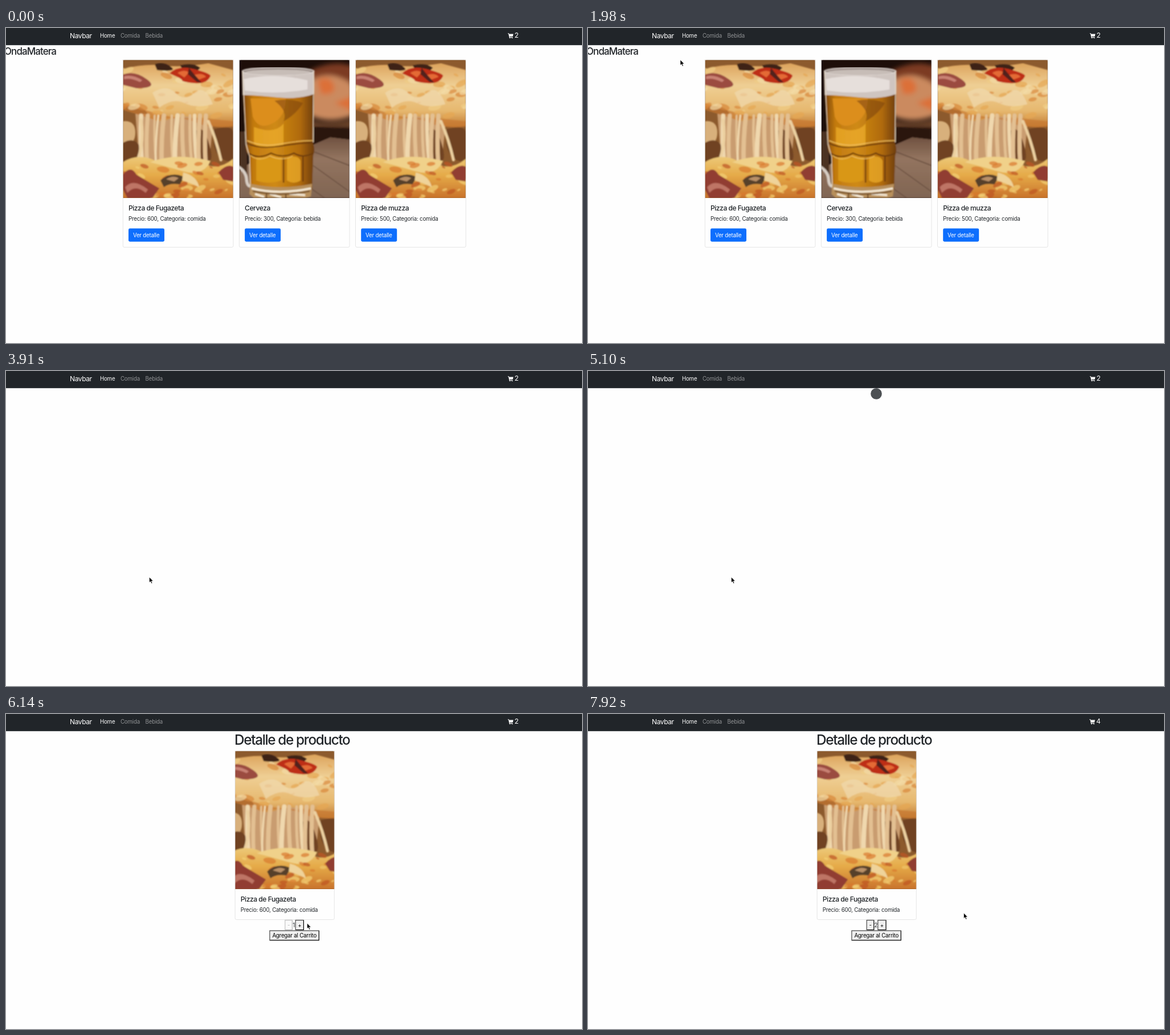
Write an HTML page that moves like this. It is 1011 by 554 pixels and loops after 8 s.

```html
<!DOCTYPE html>
<html lang="es">
<head>
<meta charset="utf-8">
<title>Tienda</title>
<style>
html, body { margin: 0; width: 100%; height: 100%; overflow: hidden; background: #fefefe; }
svg { display: block; }
#stage { width: 100vw; height: 100vh; }
text { font-family: Inter, "Liberation Sans", sans-serif; font-optical-sizing: none; fill: #212529; white-space: pre; }
.p { font-size: 9.7px; letter-spacing: -.021em; }
.h5 { font-size: 12.1px; letter-spacing: -.04em; }
.h3 { font-size: 17px; letter-spacing: -.055em; }
.h1 { font-size: 24.25px; letter-spacing: -.054em; }
.m { font-weight: 500; }
</style>
</head>
<body>
<svg id="stage" viewBox="0 0 1011 554" preserveAspectRatio="none">
  <defs>
    <filter id="soft" x="0" y="0" width="1" height="1"><feGaussianBlur stdDeviation=".8"/></filter>
    <filter id="blur"><feGaussianBlur stdDeviation="4"/></filter>
    <linearGradient id="melt" x2="0" y2="1">
      <stop stop-color="#dca35c"/><stop offset=".35" stop-color="#efcf94"/>
      <stop offset=".75" stop-color="#e6b86f"/><stop offset="1" stop-color="#c27a32"/>
    </linearGradient>
    <linearGradient id="base" x2="0" y2="1">
      <stop stop-color="#ecc878"/><stop offset=".45" stop-color="#e5aa48"/><stop offset="1" stop-color="#c9732b"/>
    </linearGradient>
    <linearGradient id="ale">
      <stop stop-color="#7c4508"/><stop offset=".15" stop-color="#c27a10"/><stop offset=".45" stop-color="#cf8a16"/>
      <stop offset=".8" stop-color="#b06a0a"/><stop offset="1" stop-color="#6d3d0a"/>
    </linearGradient>
    <linearGradient id="table" x2="0" y2="1">
      <stop stop-color="#6f5140"/><stop offset=".35" stop-color="#93745f"/><stop offset="1" stop-color="#806553"/>
    </linearGradient>
    <g id="pizza">
      <path fill="#8c5a2d" d="M0 0H194V243H0Z"/>
      <g filter="url(#soft)">
        <path fill="#c99c70" d="M22 95H160L150 195H30Z"/>
        <path fill="#d8b07c" d="M0 108Q22 106 22 128T0 150Z"/>
        <path fill="#704320" d="M0 146Q30 130 34 172L0 184ZM126 128Q140 108 152 150T134 172Q122 162 126 128ZM160 122Q194 112 194 130V178Q168 182 160 150Z"/>
        <path fill="url(#melt)" d="M0 16Q40 6 72 10T150 6L194 18V116Q160 122 138 108T84 104 44 96 0 82Z"/>
        <path fill="#c87930" d="M0 76Q38 88 66 96T136 102L194 108V118Q154 122 128 110T58 106L0 88Z" opacity=".65"/>
        <g id="topSpots"></g>
        <path fill="#9b4b40" d="M0 26Q20 18 42 34T24 50L0 44Z"/>
        <path fill="#c98274" d="M2 29Q18 25 34 36L30 39Q14 31 2 34Z"/>
        <path fill="#3d2419" d="M56 8Q70 2 84 12T60 18ZM100 10Q124 4 136 14L130 20 104 15Z"/>
        <path fill="#be2d18" d="M82 24Q96 9 124 16T154 28Q148 43 126 41T104 36 82 24Z"/>
        <path fill="#e46a35" d="M96 23Q108 16 116 22L108 31ZM124 27Q140 22 146 30L130 36Z"/>
        <path fill="#51231a" d="M116 14L124 24 138 40 130 39 114 25Z"/>
        <path fill="#f0d9ad" d="M52 58Q76 42 92 58T126 58 158 78Q128 86 108 76T64 84Z" opacity=".75"/>
        <g id="strands" fill="none" stroke-linecap="round"></g>
        <path fill="url(#base)" d="M0 180Q26 164 54 176T100 178 142 182 194 174V243H0Z"/>
        <path fill="#f0d18a" d="M48 180Q92 162 154 178 140 206 106 196T48 180Z"/>
        <g id="lowSpots"></g>
        <path fill="#913e32" d="M0 202Q14 184 24 202L64 226 52 243H8L0 228ZM168 198Q182 182 194 188V214L176 211Z"/>
        <path fill="#be7465" d="M4 224Q18 207 44 228L40 234Q22 218 8 234Z"/>
        <path fill="#56402c" d="M66 212Q84 195 108 206L100 219Q82 216 72 224Z"/>
        <path fill="#b99068" d="M76 210Q88 202 98 208L90 214Z"/>
        <path fill="#efd39a" d="M106 198Q130 204 134 224 118 216 104 212Z"/>
      </g>
    </g>
    <g id="beer">
      <path fill="#1d0e09" d="M0 0H194V243H0Z"/>
      <g filter="url(#blur)">
        <path fill="#7c3a20" d="M126 18Q168 -2 200 12V40H126Z"/>
        <path fill="#cb8a5e" d="M124 38Q158 14 200 44V98Q160 114 124 98Z"/>
        <path fill="#dc6f38" d="M138 36Q160 26 166 44T144 60ZM168 76L198 64V90Z"/>
        <path fill="#6d4429" d="M124 106Q160 116 200 104V120H124Z"/>
      </g>
      <g filter="url(#soft)">
        <path fill="url(#table)" d="M126 150L160 136 194 140V243H0V196L20 180Z"/>
        <path fill="#2a160f" d="M124 118L194 122V140L160 136 124 152Z"/>
        <path fill="none" stroke="#654b3c" stroke-width="1.4" d="M130 186L194 232M132 162L194 186M126 226L150 243"/>
        <path fill="#4c3020" d="M0 126H14V202L0 190Z"/>
        <path fill="none" stroke="#d8cec4" stroke-width="5" d="M-2 188Q12 196 13 210T22 222"/>
        <path fill="url(#ale)" d="M6 56H132L130 148Q134 158 130 168L128 228H20L18 170Q10 158 12 148Z"/>
        <path fill="#dc8e1e" d="M20 68H82Q82 100 58 112T24 100Z"/>
        <path fill="#7b430a" d="M62 72Q90 66 112 76 100 96 78 108 86 90 62 72Z" opacity=".55"/>
        <path fill="#efb02d" d="M26 118Q62 132 78 112V150Q50 162 26 148ZM84 172Q104 166 108 178V212Q96 220 84 212Z" opacity=".7"/>
        <path fill="#d99717" d="M30 172H74V212Q50 220 30 212Z"/>
        <path fill="none" stroke="#6b3b08" stroke-width="2.2" d="M12 146Q36 158 70 152T130 146M16 164Q34 176 56 164 76 174 96 164 112 174 130 164M78 172V216M112 170V214"/>
        <path fill="none" stroke="#f0c15e" stroke-width="1.4" d="M14 142Q40 154 72 148T129 142M20 168Q34 180 54 169 76 179 94 169"/>
        <path fill="#cfc5c0" d="M5 20Q66 10 132 20V60Q104 70 66 66T6 62Z"/>
        <path fill="#eee9e5" d="M8 34Q60 22 120 36V52Q66 62 10 54Z" opacity=".75"/>
        <ellipse cx="68.500" cy="20" rx="63" ry="7" fill="#9d918b" stroke="#e6dfda" stroke-width="1.5"/>
        <ellipse cx="68.500" cy="22" rx="57" ry="5" fill="#c7bdb7"/>
        <path fill="none" stroke="#e8dac4" stroke-width="1.4" d="M6 20L12 148 18 170 20 232M131 20L130 145"/>
        <path fill="#b8905c" d="M20 218Q72 230 128 218L126 240 116 243H26L18 236Z"/>
        <path fill="none" stroke="#f4e9d5" stroke-width="3.500" d="M22 226Q70 238 126 226M28 236L44 241M54 236L74 242M88 236L116 238"/>
        <path fill="none" stroke="#66411e" stroke-width="2" d="M24 231Q72 241 124 231M48 235V243M82 236V243"/>
      </g>
    </g>
  </defs>
  <rect width="1011" height="554" fill="#fefefe"/>
  <g id="list"></g>
  <circle id="spinner" cx="506" cy="40" r="9.8" fill="#212529"/>
  <g id="detail"></g>
  <g id="nav"></g>
  <g id="arrow"><path d="M0 0V9.600L2.200 7.600 3.700 11.200 5.300 10.500 3.800 7.100H6.800Z" stroke="#fff" stroke-width=".6"/></g>
  <g id="hand"><path d="M1.600 6V1.200a.9.9 0 0 1 1.800 0V4.200l2.700.6q1 .3.800 1.700L6.300 11H2.700L.3 7.400q-.4-1.200.5-1.400z" fill="#fff" stroke="#111" stroke-width=".8"/><path d="M3.700 7V9.500M5 7V9.500" stroke="#111" stroke-width=".4"/></g>
</svg>
<script>
const LOOP = 8000;
const $ = id => document.getElementById(id);
const show = (el, on) => el.setAttribute('display', on ? 'inline' : 'none');
const text = (x, y, cls, str, more = '') => `<text x="${x}" y="${y}" class="${cls}" ${more}>${str}</text>`;

let seed = 11;
const rand = () => (seed = seed * 16807 % 2147483647) / 2147483647;

function spots(n, top, height, colors) {
  let out = '';
  for (let i = 0; i < n; i++) {
    const x = rand() * 194, y = top + rand() * height, r = 2 + rand() * 6;
    out += `<ellipse cx="${x}" cy="${y}" rx="${r * 1.5}" ry="${r * .7}" fill="${colors[i % colors.length]}" opacity=".7" transform="rotate(${rand() * 60 - 30} ${x} ${y})"/>`;
  }
  return out;
}

function strands() {
  let out = '';
  for (let i = 0; i < 12; i++) {
    const x = 30 + i * 10.5 + rand() * 5, end = x + rand() * 10 - 5, w = 3 + rand() * 5;
    out += `<path d="M${x} 98Q${(x + end) / 2 - 3} 140 ${end} 182" stroke="${i % 3 ? '#e3c092' : '#f0d8ae'}" stroke-width="${w}"/>`;
  }
  return out + '<path d="M150 108Q164 140 172 176M32 106Q38 142 26 176" stroke="#ecd0a0" stroke-width="5"/>';
}

function card(x, y, w, h, art, name, info) {
  return `<svg x="${x}" y="${y}" width="${w}" height="243" viewBox="${(194 - w) / 2} 0 ${w} 243"><use href="#${art}"/></svg>
    <rect x="${x}" y="${y}" width="${w}" height="${h}" rx="2.500" fill="none" stroke="#dcdcdc" stroke-width=".7"/>`
    + text(x + 9.7, y + 264.6, 'h5 m', name) + text(x + 9.7, y + 283.2, 'p', info);
}

function listItem(x, art, name, info) {
  return card(x, 56, 193.6, 329.6, art, name, info)
    + `<rect class="btn" x="${x + 9.7}" y="352.500" width="63" height="23.200" rx="2.400" fill="#0d6efd"/>`
    + text(x + 17.6, 367.6, 'p', 'Ver detalle', 'style="fill:#fff"');
}

// Button with a raised border
function bevel(x, y, w, h, label, tx, fill, off) {
  const light = off ? '#c4c4c4' : '#4c4c4c', dark = off ? '#b4b4b4' : '#000', ink = off ? '#b0b0b0' : '#000';
  const r = x + w, b = y + h, k = 1.2;
  return `<rect x="${x}" y="${y}" width="${w}" height="${h}" fill="${fill}"/>
    <path fill="${light}" d="M${x} ${b}V${y}H${r}L${r - k} ${y + k}H${x + k}V${b - k}Z"/>
    <path fill="${dark}" d="M${r} ${y}V${b}H${x}L${x + k} ${b - k}H${r - k}V${y + k}Z"/>`
    + text(tx, y + 12.7, 'p', label, `style="fill:${ink}"`);
}

$('topSpots').innerHTML = spots(46, 14, 86, ['#f3dba6', '#e6a752', '#f0cd86', '#d9873a']);
$('lowSpots').innerHTML = spots(42, 182, 60, ['#f4d277', '#d9792e', '#f0c56a', '#bd5422']);
$('strands').innerHTML = strands();

$('list').innerHTML = text(-3, 47, 'h3 m', 'OndaMatera')
  + listItem(205.3, 'pizza', 'Pizza de Fugazeta', 'Precio: 600, Categoria: comida')
  + listItem(409.4, 'beer', 'Cerveza', 'Precio: 300, Categoria: bebida')
  + listItem(613.5, 'pizza', 'Pizza de muzza', 'Precio: 500, Categoria: comida');
$('detail').innerHTML = text(401, 54, 'h1 m', 'Detalle de producto')
  + card(402.1, 65, 174.2, 296.6, 'pizza', 'Pizza de Fugazeta', 'Precio: 600, Categoria: comida')
  + '<g id="buttons"></g>';
$('nav').innerHTML = '<rect width="1011" height="30.200" fill="#212529"/>'
  + text(112, 18.2, 'h5', 'Navbar', 'style="fill:#fff"')
  + text(165, 17.3, 'p', 'Home', 'style="fill:#fff"')
  + text(201, 17.3, 'p', 'Comida', 'style="fill:#909294"')
  + text(244.6, 17.3, 'p', 'Bebida', 'style="fill:#909294"')
  + `<g id="cart" fill="#fff"><path d="M0 0H1.900L2.200 1.200H9.700L8.600 5.900H3.200L3.400 6.800H8.300V7.700H2.600L1.200 1H0Z"/>
     <circle cx="3.700" cy="8.100" r=".95"/><circle cx="7.700" cy="8.100" r=".95"/></g>`
  + text(892.6, 17, 'h5', '2', 'id="total" style="fill:#fff"');

// Pointer stops: time, x, y
const stops = [
  [500, 359, 436], [650, 378, 440], [790, 402, 444], [940, 418, 446],
  [1230, 444, 432], [1380, 330, 262], [1530, 240, 146],
  [1830, 204, 92], [1980, 162, 56], [2120, 178, 13], [2270, 188, 20], [2420, 204, 84],
  [2570, 234, 200], [2720, 256, 312], [2860, 264, 366], [3010, 256, 364], [3160, 251.5, 362.5],
  [5690, 290, 336], [5840, 382, 312], [5990, 476, 336], [6140, 528.5, 368],
  [6290, 518, 370], [6440, 514, 370.5], [6740, 515, 374], [6890, 518, 381], [7040, 521, 386],
  [7185, 521.5, 387.5], [7920, 659.5, 350]
];
const within = (t, a, b) => t >= a && t < b;

let lastKey = '';
function drawButtons(t) {
  const two = t >= 6590, plusHot = within(t, 6290, 6890), addHot = within(t, 6890, 7920);
  const pressed = within(t, 7185, 7330);
  const key = [two, plusHot, addHot, pressed].join();
  if (key === lastKey) return;
  lastKey = key;
  const d = two ? .6 : 0;
  $('buttons').innerHTML =
    bevel(489.2 - d, 362, 13.8, 18.2, '-', 494 - d, two ? '#efefef' : '#fafafa', !two)
    + text(two ? 502.5 : 503.3, 374.7, 'p', two ? '2' : '1')
    + bevel(507.6 + d, 362, 15.4, 18.2, '+', 512.2 + d, plusHot ? '#e5e5e5' : '#efefef')
    + bevel(462.3, 380.5, 87.6, 18, 'Agregar al Carrito', 467.4, pressed ? '#f5f5f5' : addHot ? '#e5e5e5' : '#efefef');
}

function draw(t) {
  show($('list'), t < 3910);
  show($('detail'), t >= 5250);
  drawButtons(t);

  document.querySelector('.btn').setAttribute('fill', t < 3010 ? '#0d6efd' : t < 3160 ? '#0c66ea' : '#0b5ed7');

  const step = 148.7, age = Math.floor((t - 3910) / step) * step + 10;
  const phase = age / 750 % 1;
  show($('spinner'), within(t, 3910, 5250));
  $('spinner').setAttribute('r', Math.max(0, 9.8 * Math.min(1, phase * 2)));
  $('spinner').setAttribute('opacity', Math.max(0, 1 - Math.abs(phase * 2 - 1)));

  const full = t >= 7330;
  $('total').textContent = full ? '4' : '2';
  $('total').setAttribute('x', full ? 892 : 892.6);
  $('cart').setAttribute('transform', `translate(${full ? 880.2 : 880.8} 9.2)`);

  const stop = stops.filter(s => s[0] <= t).pop();
  const link = within(t, 2860, 3910) || within(t, 6290, 7920);
  show($('arrow'), stop && !link);
  show($('hand'), stop && link);
  if (stop) for (const id of ['arrow', 'hand']) $(id).setAttribute('transform', `translate(${stop[1]} ${stop[2]})`);
}

const start = performance.now();
function tick() {
  draw((performance.now() - start) % LOOP);
  requestAnimationFrame(tick);
}
tick();
</script>
</body>
</html>
```
